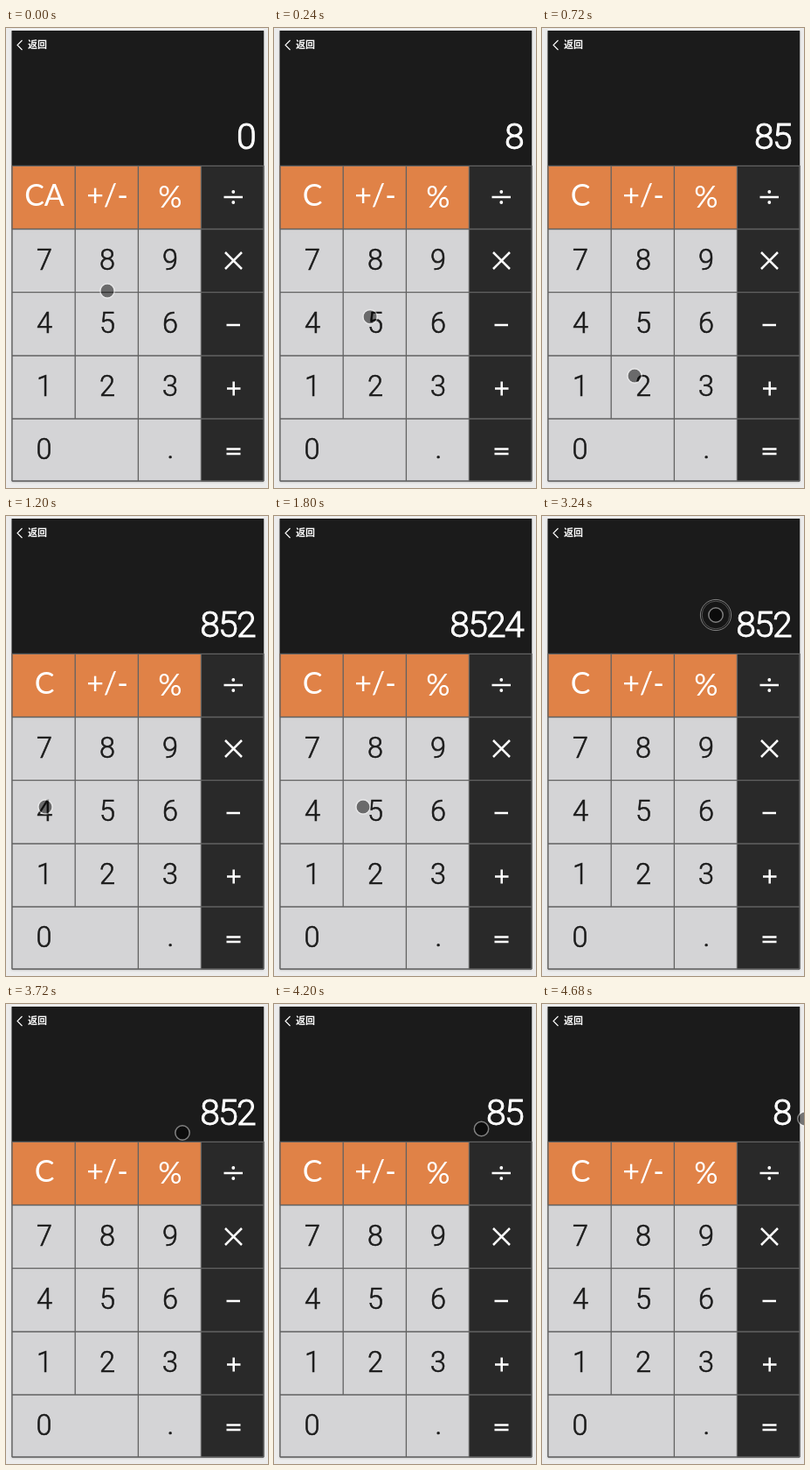
These frames come from a looping animation (300x525 px, 4800 ms). An HTML page:

```html
<!DOCTYPE html>
<html lang="zh">
<head>
<meta charset="utf-8">
<style>
  html, body { margin: 0; width: 100%; height: 100%; overflow: hidden; background: #ececec; }
  svg { display: block; width: 300px; height: 525px; }
  text { text-anchor: middle; }
  .num { font: 300 32.5px Roboto, sans-serif; fill: #1b1b1b; stroke: #1b1b1b; stroke-width: .6; }
  .fn { font: 34px Lato, sans-serif; fill: #fff; }
  #display { font: 300 41px Roboto, sans-serif; letter-spacing: -1.8px; text-anchor: end;
    fill: #fff; stroke: #fff; stroke-width: 1; }
  .back { font: bold 11px "Noto Sans CJK SC", "Noto Sans CJK", sans-serif; fill: #fff; text-anchor: start; }
  .icon { fill: none; stroke: #fff; stroke-width: 2.5; }
  .phone { filter: drop-shadow(0 1px 1px rgba(0, 0, 0, .2)); }
</style>
</head>
<body>
<svg viewBox="0 0 300 525">
  <rect class="phone" x="6.5" y="3" width="288.7" height="514.3" fill="#1b1b1b"/>
  <path d="M18.5 14L13 19.5L18.5 25" fill="none" stroke="#fff" stroke-width="1.1"/>
  <text class="back" x="25" y="23">返回</text>
  <text id="display" x="285" y="138"></text>
  <rect x="6.5" y="157" width="217" height="72.5" fill="#e08247"/>
  <rect x="6.5" y="229.5" width="217" height="287.8" fill="#d4d4d6"/>
  <rect x="223.5" y="157" width="71.7" height="360.3" fill="#292929"/>
  <path d="M7 157.3H295M7 229.5H295M7 301.7H295M7 374H295M7 446H295M7 517H295
    M7 157V517M79.2 157V446M151.4 157V517M223.4 157V517M295 157V517"
    fill="none" stroke="#626262" stroke-width="1.3"/>
  <g id="keys"></g>
  <path class="icon" d="M249.5 193H271M251 256L270 275M270 256L251 275M252.5 339H268
    M253 411.5H268.5M260.7 403.5V419.5M252.5 480.5H268.5M252.5 486H268.5"/>
  <g fill="#fff"><circle cx="260.3" cy="187" r="1.9"/><circle cx="260.3" cy="199" r="1.9"/></g>
  <g id="cursor" fill="none" stroke="#fff" stroke-opacity=".45">
    <g id="ring">
      <circle r="17.6" fill="#000" fill-opacity=".2"/>
      <circle r="15.8" stroke-opacity=".25"/>
    </g>
    <circle r="7.5" fill="#000" fill-opacity=".5" stroke="none"/>
    <circle r="8.2" stroke-width="1.5"/>
  </g>
</svg>
<script>
const LOOP = 4800, STEP = 120, MOVE = 360, PRESS = 240;
const taps = [1320, 3240];
const $ = id => document.getElementById(id);
const stops = [], edits = [];

function stop(at, x, y, digit) {
  stops.push({ at, x, y });
  if (digit) edits.push({ at: at + PRESS, apply: v => v + digit });
}

// A swipe to the right removes the last digit, then the pointer drifts back.
function swipe(at, y, reach) {
  stop(at, 202, y);
  stop(at + MOVE, reach, y - 3);
  stop(at + MOVE + 240, 199, y - 6);
  edits.push({ at: at + MOVE, apply: v => v.slice(0, -1) });
}

stop(0, 116, 300, "8");
stop(360, 108, 340, "5");
stop(600, 106, 397, "2");
stop(1200, 45, 332, "4");
stop(1800, 102, 332);
stop(2280, 202, 119);
swipe(2640, 119, 300);
swipe(3720, 147, 276);
swipe(4320, 134, 301);

function addKey(label, x, y, cls) {
  const key = document.createElementNS("http://www.w3.org/2000/svg", "text");
  key.setAttribute("x", x);
  key.setAttribute("y", y);
  key.setAttribute("class", cls);
  key.textContent = label;
  return $("keys").appendChild(key);
}

const clear = addKey("CA", 44, 203, "fn");
addKey("+/-", 116, 203, "fn");
addKey("%", 188, 205, "fn");
[..."789456123"].forEach((n, i) =>
  addKey(n, 44 + i % 3 * 72, 275.5 + Math.floor(i / 3) * 72.2, "num"));
addKey("0", 43.5, 491.5, "num");
addKey(".", 188.5, 491, "num");

// The pointer rests at each stop until the last MOVE ms before the next one.
function locate(t) {
  const i = stops.findIndex(s => s.at > t);
  const a = stops[i - 1], b = stops[i];
  const from = Math.max(a.at, b.at - MOVE);
  const k = Math.max(0, (t - from) / (b.at - from));
  const ease = k * k * (3 - 2 * k);
  return [a.x + (b.x - a.x) * ease, a.y + (b.y - a.y) * ease];
}

function draw(t) {
  const value = edits.filter(e => e.at <= t).reduce((v, e) => e.apply(v), "");
  $("display").textContent = value || "0";
  clear.textContent = value ? "C" : "CA";
  $("cursor").setAttribute("transform", `translate(${locate(t)})`);
  $("ring").style.display = taps.includes(t) ? "" : "none";
}

const start = performance.now();
function frame() {
  const t = (performance.now() - start) % LOOP;
  draw(Math.floor(t / STEP) * STEP);
  requestAnimationFrame(frame);
}
frame();
</script>
</body>
</html>
```
